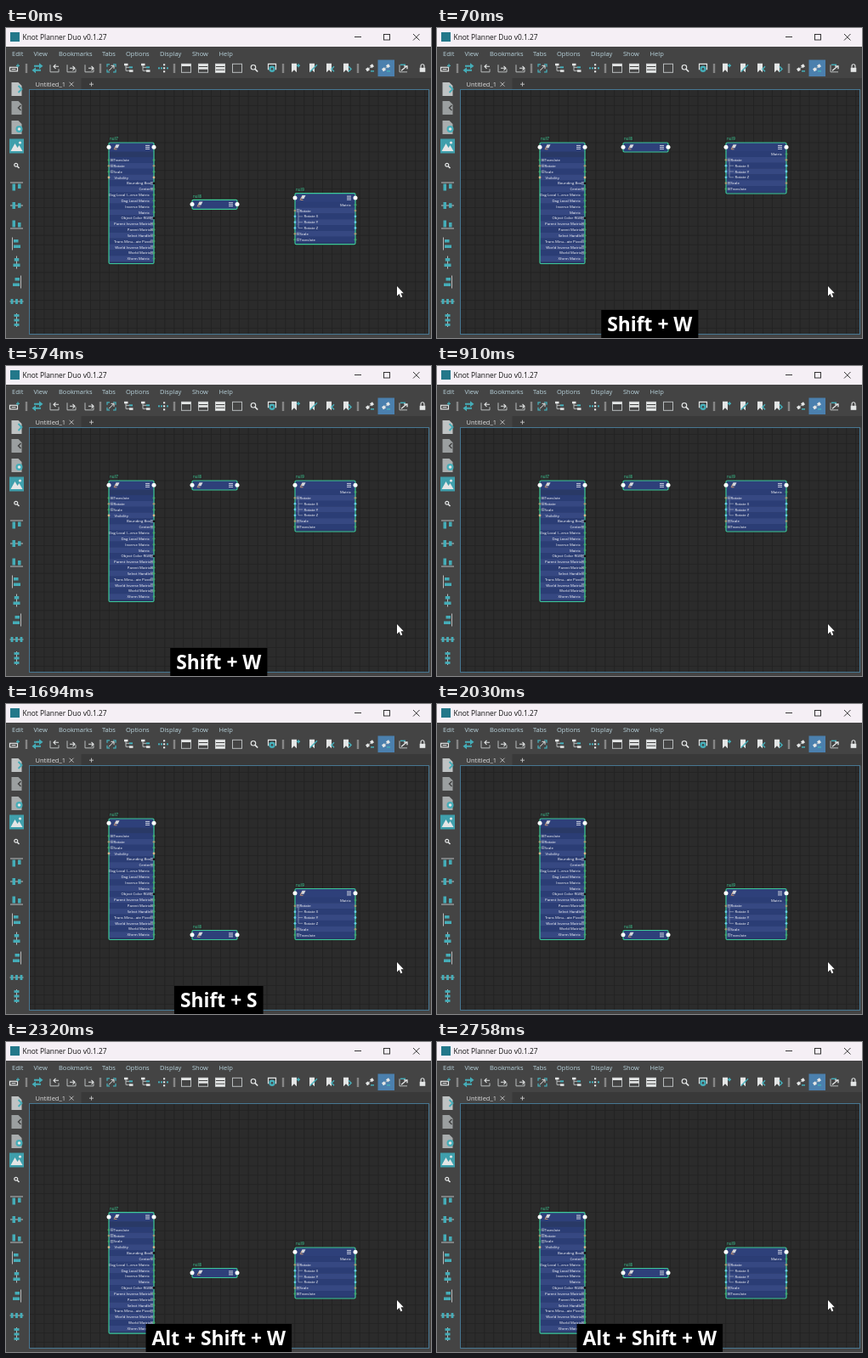
Write an HTML page with a canvas that moves like this. It is 500 by 365 pixels and loops after 3.05 s.

```html
<!DOCTYPE html>
<html lang="en">
<head>
<meta charset="utf-8">
<title>Node alignment shortcuts</title>
<style>
html, body { margin: 0; width: 100%; height: 100%; overflow: hidden; background: #444; }
canvas { display: block; width: 500px; height: 365px; }
</style>
</head>
<body>
<canvas id="stage"></canvas>
<script>
const LOOP = 3050;
// Start time, top of each of the three nodes, pressed keys
const POSES = [
  [0, [135, 202.3, 194.7], ''],
  [70, [135, 135, 135], 'Shift + W'],
  [910, [135, 135, 135], ''],
  [1190, [135, 266.5, 217.5], 'Shift + S'],
  [2030, [135, 266.5, 217.5], ''],
  [2320, [200.7, 266.5, 242], 'Alt + Shift + W']
];
const WHITE = '#e4e6e6', GREY = '#b8bcbd', TEAL = '#45adb8', DARK = '#2b2b2b';
const ROW = 6.83;

const canvas = document.getElementById('stage');
const ctx = canvas.getContext('2d');
const ratio = window.devicePixelRatio || 1;
canvas.width = 500 * ratio;
canvas.height = 365 * ratio;
ctx.scale(ratio, ratio);

function rect(x, y, w, h, color) {
  ctx.fillStyle = color;
  ctx.fillRect(x, y, w, h);
}

function frame(x, y, w, h, color, width = 1) {
  ctx.strokeStyle = color;
  ctx.lineWidth = width;
  ctx.strokeRect(x, y, w, h);
}

function dot(x, y, r, color) {
  ctx.fillStyle = color;
  ctx.beginPath();
  ctx.arc(x, y, r, 0, 7);
  ctx.fill();
}

function text(str, x, y, size, color, align = 'left', weight = 400) {
  ctx.font = `${weight} ${size}px "Open Sans", "Noto Sans", sans-serif`;
  ctx.textAlign = align;
  ctx.fillStyle = color;
  ctx.fillText(str, x, y);
}

function at(x, y, draw) {
  ctx.save();
  ctx.translate(x, y);
  draw();
  ctx.restore();
}

function line(d, color, width = 1) {
  ctx.strokeStyle = color;
  ctx.lineWidth = width;
  ctx.stroke(new Path2D(d));
}

function fill(d, color) {
  ctx.fillStyle = color;
  ctx.fill(new Path2D(d));
}

// Icons, each drawn around its centre
const tray = arrow => () => {
  line('M-5 -4V4.5H5V1', GREY);
  line(arrow, WHITE, 1.1);
};
const swap = () => {
  line('M-4 -2.5H3M-3 2.5H4', TEAL, 2);
  fill('M2 -6L6.5 -2.5L2 1ZM-2 -1L-6.5 2.5L-2 6Z', TEAL);
};
const marquee = () => {
  line('M-2 -4.5H-5V-1.5M2 -4.5H5V-1.5M-2 4.5H-5V1.5M2 4.5H5V1.5', TEAL, 1.3);
  line('M-3 3L3 -3M-.5 -3H3V.5', WHITE);
};
const branch = () => {
  line('M-3 -4V3H3M-3 -1H2', GREY);
  rect(-5, -5.5, 4.5, 2.5, WHITE);
  rect(1, -2, 4, 2, TEAL);
  rect(1, 2, 4.5, 2.5, WHITE);
};
const network = () => {
  for (const y of [-4, 0, 4]) rect(0, y - 1, 2.2, 2, WHITE);
  for (const x of [-6, -3, 4]) rect(x, -1, 2, 2, TEAL);
};
const bands = count => () => {
  frame(-5.5, -5, 11, 10, GREY);
  for (let i = 0; i < count; i++) rect(-5.5, -5 + i * 3.7, 11, 2.7, WHITE);
};
const search = size => () => {
  ctx.beginPath();
  ctx.arc(-size / 4, -size / 4, size * .65, 0, 7);
  ctx.strokeStyle = WHITE;
  ctx.lineWidth = 1.2;
  ctx.stroke();
  line(`M${size * .25} ${size * .25}L${size} ${size}`, WHITE, 1.6);
};
const gearView = () => {
  line('M-4.5 2V-5H4.5V2', WHITE, 1.2);
  dot(0, 1, 3.7, TEAL);
  dot(0, 1, 1.3, '#444');
};
const bookmark = mark => () => {
  fill('M-4 -5.5H2V5L-1 2L-4 5Z', WHITE);
  line(mark, TEAL, 1.5);
};
const linkIcon = () => {
  line('M-4 3L3 -3', GREY);
  fill('M-5 1L-2 -1L0 2L-3 4Z', WHITE);
  fill('M0 -3L3 -5L5 -2L2 0Z', WHITE);
  line('M1 3.5H5', TEAL, 1.5);
};
const linkPanel = () => {
  line('M-5 -4V4.5H4', GREY);
  line('M-4 -4H2', TEAL, 1.5);
  line('M-3 3L3 -2M0 -2.5H4V1', WHITE, 1.3);
};
const lock = () => {
  line('M-2 0V-2.5A2 2 0 0 1 2 -2.5V0', WHITE, 1.1);
  rect(-3.3, -.5, 6.6, 5, WHITE);
};
const addNode = () => {
  frame(-5.5, -1, 9, 4.5, WHITE, 1.2);
  line('M-3.5 1.2H1.5', WHITE);
  line('M4 -5V-1M2 -3H6', TEAL, 1.2);
};

const TOOLS = [
  [10, addNode], [37, swap],
  [57, tray('M5 -2H-1M1.5 -4.5L-1 -2L1.5 .5')],
  [77, tray('M-2 0H4M1.5 -2.5L4 0L1.5 2.5')],
  [98, tray('M-1 0H5M2.5 -2.5L5 0L2.5 2.5')],
  [124, marquee], [144, branch], [164, branch], [185, network],
  [212, bands(1)], [232, bands(2)], [252, bands(3)], [272, bands(0)],
  [292, search(4.2)], [313, gearView],
  [340, bookmark('M4 -5V-1M2 -3H6')], [361, bookmark('M-3 4L5 -4')],
  [381, bookmark('M5 -2L2 1L5 4')], [401, bookmark('M2 -2L5 1L2 4')],
  [428, linkIcon], [447, linkIcon], [468, linkPanel], [490, lock]
];

const page = (color, extra) => () => {
  fill('M-6 -8H2L6 -4V8H-6Z', color);
  extra();
};
// Alignment bars; side is -1, 0 or 1 for start, middle and end
const align = (side, turned) => () => {
  if (turned) ctx.rotate(-Math.PI / 2);
  rect(-7.5, side * 5 - .5, 15, 1, GREY);
  const top = h => side < 0 ? -3.5 : side > 0 ? 3.5 - h : -h / 2;
  rect(-5, top(8), 3.5, 8, TEAL);
  rect(1.5, top(5.5), 3.5, 5.5, TEAL);
};
const distribute = turned => () => {
  if (turned) ctx.rotate(Math.PI / 2);
  line('M-8 0H8', GREY);
  for (const x of [-5.5, 0, 5.5]) rect(x - 1.4, -3, 2.8, 6, TEAL);
};
const SIDEBAR = [
  [72, page('#bfc3c4', () => line('M2 -4L6 0L2 4', TEAL, 1.8))],
  [94, page('#9b9fa0', () => line('M5 -3L2 0L5 3', '#444', 1.5))],
  [117, page('#a9adae', () => { dot(3, 2, 4, TEAL); dot(3, 2, 1.8, WHITE); })],
  [139, () => {
    rect(-8.5, -8.5, 17, 17, '#3f9fac');
    fill('M-7 6L-2 -3L1 2L3 -1L7 6Z', WHITE);
    dot(4, -4, 1.6, WHITE);
  }],
  [162, search(3)],
  [187, align(-1)], [209, align(0)], [231, align(1)],
  [254, align(-1, true)], [276, align(0, true)], [299, align(1, true)],
  [322, distribute(false)], [344, distribute(true)]
];

const MENU = [['Edit', 7], ['View', 32.5], ['Bookmarks', 62], ['Tabs', 113],
  ['Options', 141], ['Display', 181], ['Show', 219], ['Help', 250.5]];

function drawWindow() {
  rect(0, 0, 500, 365, '#444');
  rect(0, 0, 500, 22, '#f5eff5');
  rect(5, 5, 11, 11, '#23788a');
  text('Knot Planner Duo v0.1.27', 19.5, 13.8, 8.4, '#111');
  line('M410 10.5H418M479 7L486.5 14.5M486.5 7L479 14.5', '#222', .9);
  frame(444.5, 7.5, 7, 6.5, '#222', .9);
  for (const [label, x] of MENU) text(label, x, 32.7, 7.5, '#b9d3dc');

  rect(437.5, 37.5, 19.5, 19.5, '#4b80ae');
  for (const x of [24, 111, 198, 326, 414]) rect(x - 1.2, 42, 2.4, 11, '#858585');
  for (const [x, icon] of TOOLS) at(x, 47.3, icon);
  for (const [y, icon] of SIDEBAR) at(12.5, y, icon);

  rect(27, 59, 473, 13.5, '#393939');
  rect(27, 59, 61.5, 13.5, '#444');
  text('Untitled_1', 34.5, 68.9, 7.5, '#e0e0e0');
  line('M74.5 63.7L79.5 68.7M79.5 63.7L74.5 68.7M98 66.2H103M100.5 63.7V68.7', '#c4c4c4', .9);

  rect(27, 72, 471, 289, DARK);
  for (let x = 33.6; x < 497; x += 10.92) rect(x, 73, .8, 288, '#222');
  for (let y = 80; y < 361; y += 10.92) rect(27, y, 470, .8, '#222');
  frame(27.5, 72.5, 470, 288, '#477792');
}

// Attribute rows: inputs read from the left, outputs from the right
const left = (label, color, opens = true, indent = 0) => ({ label, color, opens, indent });
const right = (label, color, opens = false) => ({ label, color, opens, end: true });
const OLIVE = '#9c9a72', GREEN = '#42a56f', CYAN = '#65cbe2', BLACK = '#111';
const NODES = [
  { name: 'null7', x: 121, w: 53, h: 142.5, first: 20.5, rows: [
    left('Translate', GREEN), left('Rotate', OLIVE), left('Scale', GREEN),
    left('Visibility', '#d4b98a', false, 1),
    right('Bounding Box', BLACK, true), right('Center', GREEN, true),
    right('Dag Local I...erse Matrix', GREEN), right('Dag Local Matrix', GREEN),
    right('Inverse Matrix', GREEN), right('Matrix', GREEN),
    right('Object Color RGB', BLACK, true), right('Parent Inverse Matrix', GREEN, true),
    right('Parent Matrix', GREEN, true), right('Select Handle', GREEN, true),
    right('Trans Minu...ate Pivot', GREEN, true), right('World Inverse Matrix', GREEN, true),
    right('World Matrix', GREEN, true), right('Xform Matrix', GREEN)] },
  { name: 'null8', x: 219, w: 53, h: 11, rows: [] },
  { name: 'null9', x: 340, w: 71, h: 60, first: 13.5, tree: true, rows: [
    right('Matrix', GREEN), left('Rotate', OLIVE),
    left('Rotate X', CYAN, false, 5), left('Rotate Y', CYAN, false, 5),
    left('Rotate Z', CYAN, false, 5), left('Scale', OLIVE), left('Translate', GREEN)] }
];

function expander(x, y) {
  frame(x - 1.3, y - 1.3, 2.6, 2.6, '#aeb5c9', .5);
  line(`M${x - .8} ${y}H${x + .8}`, WHITE, .6);
}

function drawNode({ name, x, w, h, first, rows, tree }, y) {
  const end = x + w;
  text(name, x + 1, y - 2.6, 4.4, '#3cd29a');
  ctx.save();
  ctx.beginPath();
  ctx.roundRect(x, y, w, h, 1.5);
  ctx.fillStyle = '#293966';
  ctx.fill();
  ctx.clip();
  rect(x, y, w, 10.5, '#2e407a');
  rows.forEach((row, i) => rect(x, y + first + (i - .5) * ROW, w, ROW, i % 2 ? '#364882' : '#2b3d75'));
  ctx.restore();

  ctx.beginPath();
  ctx.roundRect(x, y, w, h, 1.5);
  ctx.strokeStyle = '#3cc998';
  ctx.lineWidth = 1.2;
  ctx.stroke();

  at(x + 9, y + 5.3, () => {
    fill('M-.5 -3H3.5L1.5 1H-2.5Z', '#d5d8de');
    line('M-3 2.7L-1 -1M-2.5 2.5H.5', '#d29a74', .9);
  });
  for (let i = -1; i < 2; i++) rect(end - 10, y + 4.9 + i * 2, 5, 1, '#c9cedd');
  dot(x, y + 5.3, 2.5, '#fff');
  dot(end, y + 5.3, 2.5, '#fff');

  if (tree) {
    const top = y + first + ROW;
    line(`M${x + 4} ${top + 2}V${top + 3 * ROW}`, '#aeb5c9', .6);
    for (let i = 1; i < 4; i++) line(`M${x + 4} ${top + i * ROW}H${x + 9}`, '#aeb5c9', .6);
  }
  rows.forEach((row, i) => {
    const mid = y + first + i * ROW;
    if (row.end) {
      text(row.label, end - (tree || !row.opens ? 5.2 : 4), mid + 1.6, 4.3, '#fff', 'right', 500);
      if (row.opens) expander(end - 2.5, mid);
    } else {
      text(row.label, x + 5.5 + row.indent, mid + 1.6, 4.3, '#fff', 'left', 500);
      if (row.opens) expander(x + 3.7, mid);
      dot(x, mid, 1.4, row.color);
    }
    dot(end, mid, 1.4, row.color);
  });
}

function drawCursor() {
  const arrow = 'M460 304V315.4L462.6 313L464.4 317.2L466.3 316.4L464.6 312.3H467.8Z';
  line(arrow, '#222');
  fill(arrow, '#fff');
}

function drawKeys(keys) {
  ctx.font = '700 22.8px "Open Sans", "Noto Sans", sans-serif';
  const width = ctx.measureText(keys).width + 14;
  rect(250.3 - width / 2, 332, width, 33, '#000');
  text(keys, 250.3, 357, 22.8, '#fff', 'center', 700);
}

function draw(now) {
  const time = now % LOOP;
  const [, tops, keys] = POSES.findLast(([start]) => time >= start);
  drawWindow();
  NODES.forEach((node, i) => drawNode(node, tops[i]));
  drawCursor();
  if (keys) drawKeys(keys);
}

let begin;
function tick(now) {
  begin ??= now;
  draw(Math.max(0, now - begin));
  requestAnimationFrame(tick);
}
requestAnimationFrame(tick);
</script>
</body>
</html>
```
